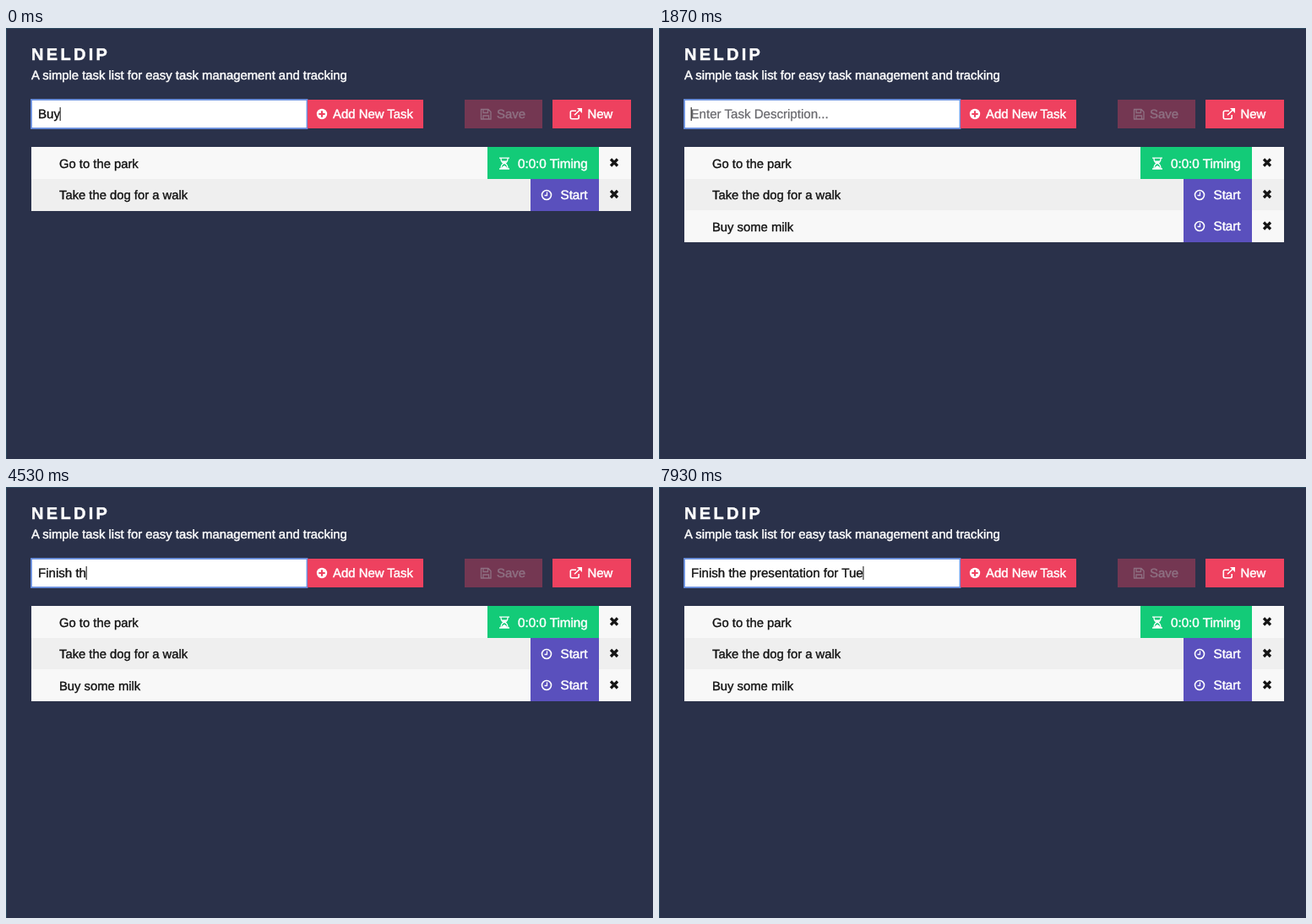
Animation, 766 px wide and 511 px high, one loop 8000 ms. Source, as an HTML page:

```html
<!DOCTYPE html>
<html lang="en">
<head>
<meta charset="utf-8">
<title>Task list</title>
<style>
  html, body { margin: 0; height: 100%; overflow: hidden; background: #2a314a; }
  svg { display: block; width: 100%; height: 100%; }
  text {
    font: 14.8px "Liberation Sans", Arial, sans-serif;
    white-space: pre;
    text-rendering: geometricPrecision;
    fill: #111; stroke: #111; stroke-width: .35px;
  }
  .light { fill: #fff; stroke: #fff; stroke-width: .45px; }
  .title { font-size: 20px; font-weight: bold; letter-spacing: 3.3px; }
  .subtitle { font-size: 14.85px; }
  .button { font-size: 14.9px; }
  .badge { font-size: 15.2px; }
  .faded { fill: #8e7082; stroke: #8e7082; }
  .field { font-size: 15.08px; }
  .hint { fill: #69696e; stroke: #69696e; stroke-width: .25px; }
  .line { fill: none; stroke: #fff; stroke-width: 1.6; }
  .thin { stroke-width: 1.3; }
</style>
</head>
<body>
<svg viewBox="0 0 766 511">
  <defs>
    <path id="cross" d="M-4 -4 4 4M4 -4 -4 4" stroke="#151515" stroke-width="3.2"/>
    <g id="start">
      <rect x="621" width="81" height="38" fill="#5a50bd"/>
      <circle class="line" cx="640" cy="19" r="5.5"/>
      <path class="line thin" d="M640.5 15.5V19.5H637.5"/>
      <text class="light badge" x="656.5" y="24.3">Start</text>
    </g>
  </defs>

  <rect width="766" height="511" fill="#2a314a"/>
  <path d="M0 .5H766M.5 0V511" stroke="#2c4960"/>

  <text class="light title" x="30" y="37.5">NELDIP</text>
  <text class="light subtitle" x="30" y="61">A simple task list for easy task management and tracking</text>

  <rect x="30" y="85" width="327" height="34" fill="#fff"/>
  <rect x="30" y="85" width="326.5" height="34" fill="none" stroke="#6a91e2" stroke-width="1.8"/>
  <text id="hint" class="field hint" x="37.5" y="107">Enter Task Description...</text>
  <text id="entry" class="field" x="38" y="107"></text>
  <rect id="caret" y="94" width="1.2" height="16" fill="#333"/>
  <path id="pointer" d="M277.5 91.5Q280.3 91.5 280.3 93.5V101.5Q280.3 103.5 277.5 103.5M283 91.5Q280.3 91.5 280.3 93.5M280.3 101.5Q280.3 103.5 283 103.5" fill="none" stroke="#555"/>

  <rect x="357" y="85" width="137" height="34" fill="#ee415f"/>
  <circle cx="374" cy="102" r="6.2" fill="#fff"/>
  <path d="M370.3 102H377.7M374 98.3V105.7" stroke="#ee415f" stroke-width="2.2"/>
  <text class="light button" x="387" y="107">Add New Task</text>

  <rect x="543" y="85" width="92" height="34" fill="#743752"/>
  <path class="line thin" style="stroke: #8e7082" d="M562.5 96.5H571L574 99.5V108H562.5ZM565 96.5V100.5H570.5V96.5M565 108V104H571.5V108"/>
  <text class="light button faded" x="581" y="107">Save</text>

  <rect x="647" y="85" width="93" height="34" fill="#ee415f"/>
  <path class="line" d="M675 98.3H670Q668.3 98.3 668.3 100V106Q668.3 107.7 670 107.7H676.5Q678.2 107.7 678.2 106V103M673 103.3 680 96.5"/>
  <path d="M676 95H682V101Z" fill="#fff"/>
  <text class="light button" x="688.5" y="107">New</text>

  <g transform="translate(0 141)">
    <rect x="30" width="710" height="38" fill="#f8f8f8"/>
    <rect x="570" width="132" height="38" fill="#13cb78"/>
    <path class="line thin" d="M584 13.2H596M584 26H596M586 13.5Q586 18 589.3 19.6Q586 21 586 26M594 13.5Q594 18 590.7 19.6Q594 21 594 26"/>
    <path d="M586.5 16.5H593.5L590 20ZM586.5 26Q587 23 590 22Q593 23 593.5 26Z" fill="#fff"/>
    <text class="light badge" x="606" y="24.5">0:0:0 Timing</text>
    <text x="63" y="24.5">Go to the park</text>
    <use href="#cross" x="720" y="18.5"/>
  </g>
  <g transform="translate(0 179)">
    <rect x="30" width="710" height="38" fill="#efefef"/>
    <use href="#start"/>
    <text x="63" y="24">Take the dog for a walk</text>
    <use href="#cross" x="720" y="18"/>
  </g>
  <g id="addedRow" transform="translate(0 216)">
    <rect x="30" width="710" height="38" fill="#f8f8f8"/>
    <use href="#start"/>
    <text x="63" y="24.5">Buy some milk</text>
    <use href="#cross" x="720" y="18.5"/>
  </g>
</svg>
<script>
  const LOOP = 8000, ADDED = 1800;
  const byId = id => document.getElementById(id);
  const [hint, entry, caret, pointer, addedRow] =
    ['hint', 'entry', 'caret', 'pointer', 'addedRow'].map(byId);

  // Each key time reveals one more character after the first `shown` ones.
  const first = {
    text: 'Buy some milk', shown: 3,
    keys: [70, 200, 330, 400, 530, 730, 870, 1000, 1130, 1330]
  };
  const second = {
    text: 'Finish the presentation for Tue', shown: 0,
    keys: [3470, 3600, 3870, 4000, 4070, 4200, 4330, 4470, 4530, 4670, 4730,
      5000, 5200, 5400, 5600, 5870, 6000, 6130, 6270, 6400, 6470, 6600, 6730,
      6800, 6870, 6930, 7000, 7470, 7530, 7670, 7930]
  };

  const within = (t, from, to) => t >= from && t < to;
  const show = (node, on) => node.setAttribute('visibility', on ? 'visible' : 'hidden');
  const typed = ({ text, shown, keys }, t) =>
    text.slice(0, shown + keys.filter(key => key <= t).length);

  function draw(t) {
    const value = typed(t < ADDED ? first : second, t);
    entry.textContent = value;
    caret.setAttribute('x', 37.6 + (value ? entry.getComputedTextLength() : 0));
    show(hint, !value);
    show(caret, !within(t, 2330, 2870) && !within(t, 3330, 3470));
    show(pointer, within(t, 2530, 3270));
    show(addedRow, t >= ADDED);
  }

  const begin = performance.now();
  function tick() {
    draw((performance.now() - begin) % LOOP);
    requestAnimationFrame(tick);
  }
  tick();
</script>
</body>
</html>
```
